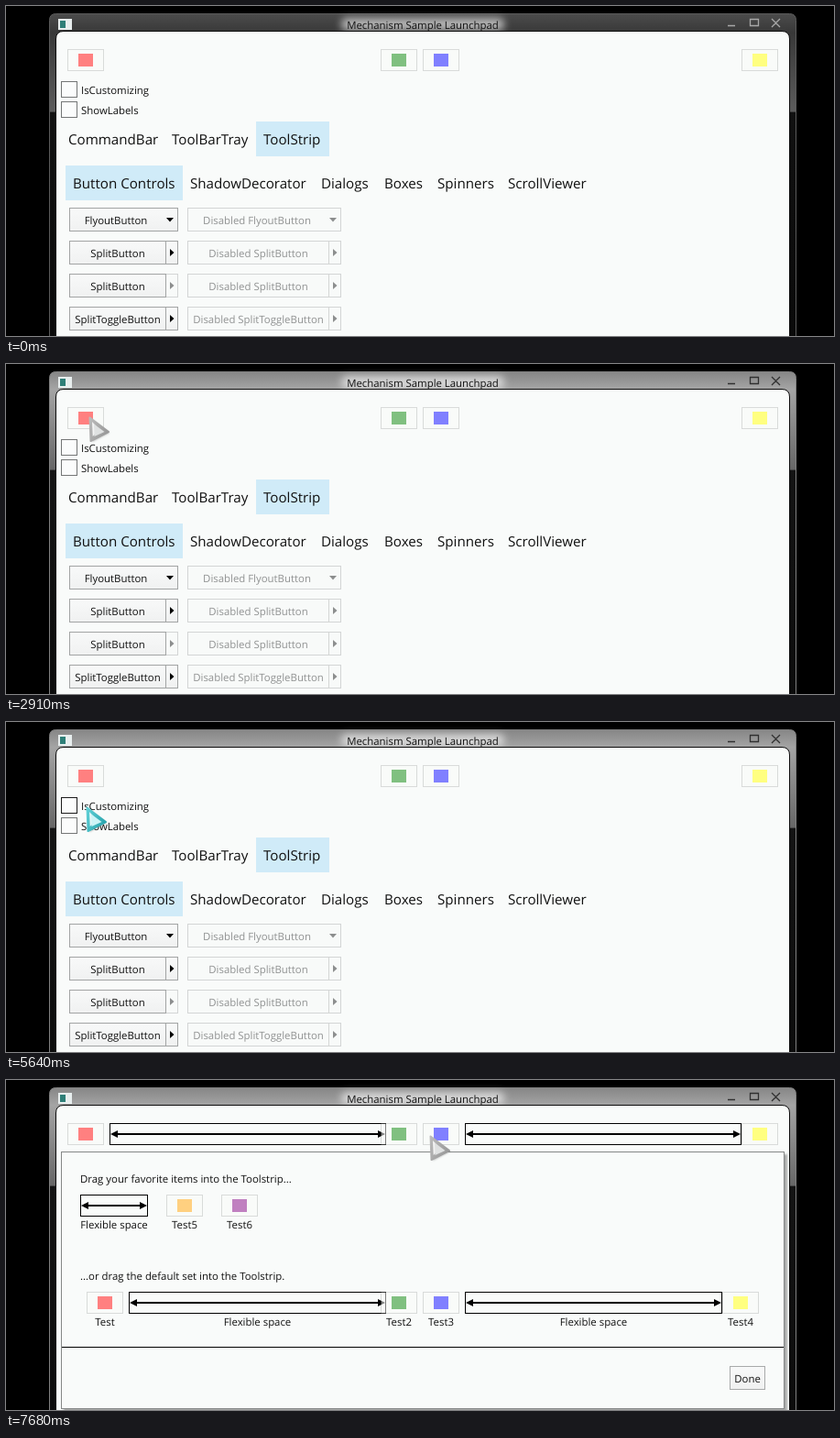
Write an HTML page that moves like this. It is 904 px wide and 360 px high and loops after 8 s.

```html
<!DOCTYPE html>
<html lang="en">
<head>
<meta charset="utf-8">
<title>Launchpad window</title>
<style>
html, body { margin: 0; width: 100%; height: 100%; overflow: hidden; background: #000; }
svg { display: block; width: 904px; height: 360px; }
text { font: 11.4px "Open Sans", "Noto Sans", sans-serif; fill: #111; text-rendering: geometricPrecision; }
.mid { text-anchor: middle; }
.tab { font-size: 15.15px; }
.off { fill: #909292; }
.box { fill: #fbfcfc; stroke: #747676; }
.hover .box { stroke: #1c1c1c; }
.tick { fill: none; stroke: #0b6496; stroke-width: 2.8; }
.hidden { display: none; }
#frame { fill: url(#dim); stroke: #5a5a5a; }
.active #frame { fill: url(#glass); stroke: #808080; }
#controls { stroke: #a8a8a8; }
.active #controls { stroke: #303030; }
</style>
</head>
<body>
<svg id="stage" viewBox="0 0 904 360">
  <defs>
    <linearGradient id="dim" x1="0" y1="8" x2="0" y2="360" gradientUnits="userSpaceOnUse">
      <stop offset="0" stop-color="#4c4c4c"/>
      <stop offset=".06" stop-color="#383838"/>
      <stop offset=".305" stop-color="#5c5c5c"/>
      <stop offset=".306" stop-color="#111"/>
      <stop offset="1" stop-color="#0a0a0a"/>
    </linearGradient>
    <linearGradient id="glass" x1="0" y1="8" x2="0" y2="360" gradientUnits="userSpaceOnUse">
      <stop offset="0" stop-color="#858585"/>
      <stop offset=".055" stop-color="#a4a4a4"/>
      <stop offset=".305" stop-color="#666"/>
      <stop offset=".306" stop-color="#141414"/>
      <stop offset="1" stop-color="#0c0c0c"/>
    </linearGradient>
    <linearGradient id="face" x1="0" y1="0" x2="0" y2="1">
      <stop offset="0" stop-color="#f8f9f9"/>
      <stop offset="1" stop-color="#f0f1f1"/>
    </linearGradient>
    <linearGradient id="silver" x1="0" y1="0" x2="1" y2=".6">
      <stop offset="0" stop-color="#bcbcbc"/>
      <stop offset="1" stop-color="#989898"/>
    </linearGradient>
    <linearGradient id="aqua" x1="0" y1="0" x2="1" y2=".6">
      <stop offset="0" stop-color="#62d2d8"/>
      <stop offset="1" stop-color="#2aa5ae"/>
    </linearGradient>
    <filter id="blur" x="-20%" y="-100%" width="140%" height="300%"><feGaussianBlur stdDeviation="4"/></filter>
    <filter id="soft"><feGaussianBlur stdDeviation="1"/></filter>
  </defs>

  <path id="frame" d="M47.5 360V15.5q0-7 7-7h801q7 0 7 7V360"/>
  <rect x="366" y="13" width="178" height="14" rx="6" fill="#fff" opacity=".62" filter="url(#blur)"/>
  <text class="mid" x="455" y="24.5">Mechanism Sample Launchpad</text>
  <rect x="57" y="14" width="15" height="12" fill="#e8eeee"/>
  <rect x="59" y="16" width="6" height="8" fill="#2f7f78"/>
  <g id="controls" fill="none" stroke-width="1.3">
    <path d="M788 21.5h8M812.5 14.5h9v7h-9zM836 14l9 9M845 14l-9 9"/>
  </g>
  <path d="M54.5 361V36q0-8.500 8.500-8.500h784q8.500 0 8.500 8.500V361z" fill="#f9fbfa" stroke="#0c0c0c"/>

  <g id="strip"></g>
  <g id="page"></g>
  <g id="panel"></g>

  <g id="cursor">
    <path d="M3 3L23 18L4 28z" fill="#000" opacity=".25" filter="url(#soft)"/>
    <path id="rim" d="M1.500 1.500L22 17L2.500 27z" stroke-width="2" stroke-linejoin="round"/>
    <path d="M4 6L12 14.500L4.700 22z" fill="#fff" opacity=".85"/>
    <path id="core" d="M6 8.500L17.500 17L6.500 22z"/>
  </g>
</svg>
<script>
const LOOP = 8000, TICK = 30;
const $ = id => document.getElementById(id);

const COLORS = {
  red: '#ff8080', green: '#80c080', blue: '#8080ff',
  yellow: '#ffff80', orange: '#ffd080', purple: '#c080c0'
};

const text = (x, y, s, cls = '') => `<text class="${cls}" x="${x}" y="${y}">${s}</text>`;
const rect = (x, y, w, h, fill, stroke) => stroke
  ? `<rect x="${x + .5}" y="${y + .5}" width="${w - 1}" height="${h - 1}" fill="${fill}" stroke="${stroke}"/>`
  : `<rect x="${x}" y="${y}" width="${w}" height="${h}" fill="${fill}"/>`;

const swatch = (x, y, color) =>
  rect(x, y, 40, 24, 'rgba(249,251,250,.5)', 'rgba(0,0,0,.13)') + rect(x + 12, y + 5, 16, 14, COLORS[color]);

function flex(x, y, w) {
  const a = x + 1, b = x + w - 1, m = y + 12;
  return rect(x, y, w, 24, 'none', '#000') +
    `<path d="M${a + 5} ${m}H${b - 5}" stroke="#000" stroke-width="2"/>` +
    `<path d="M${a} ${m}l8 -4v8zM${b} ${m}l-8 -4v8z"/>`;
}

const check = (id, y, label) => `<g id="${id}">
  <rect class="box" x="60.5" y="${y + .5}" width="17" height="17"/>
  <path class="tick hidden" d="M63.500 ${y + 9}l4 4.500l7 -9"/>
  ${text(82, y + 14, label)}</g>`;

function button(x, y, w, label, kind, enabled, arrowOn = enabled) {
  const line = on => on ? '#a2a4a4' : '#d3d5d5';
  const fill = on => on ? 'url(#face)' : '#f8faf9';
  const ink = arrowOn ? '#000' : '#8c8e8e';
  const end = x + w;
  let s = rect(x, y, w, 26, fill(arrowOn), line(arrowOn));
  if (kind === 'flyout') {
    s += `<path d="M${end - 13} ${y + 11}h8l-4 4.500z" fill="${ink}"/>`;
  } else {
    s += rect(x, y, w - 13, 26, fill(enabled), line(enabled));
    s += `<path d="M${end - 9} ${y + 9}v8l4.500 -4z" fill="${ink}"/>`;
  }
  const center = kind === 'flyout' ? x + w / 2 - 8.5 : x + (w - 13) / 2;
  return s + text(enabled ? center : Math.max(center, 274), y + 18, label, enabled ? 'mid' : 'mid off');
}

const tabs = (y, items) => items.map(([x, s]) => text(x, y, s, 'tab')).join('');

$('strip').innerHTML =
  `<g id="gaps">${flex(113, 47, 302)}${flex(501, 47, 302)}</g>` +
  [[67, 'red', 'Test'], [409, 'green', 'Test2'], [455, 'blue', 'Test3'], [803, 'yellow', 'Test4']]
    .map(([x, c, s]) => swatch(x, 47, c) + text(x + 20, 84, s, 'mid label')).join('');

$('page').innerHTML =
  check('customize', 82, 'IsCustomizing') + check('labels', 104, 'ShowLabels') +
  rect(273, 126, 80, 38, '#d0ebf8') + rect(65, 174, 128, 38, '#d0ebf8') +
  tabs(151, [[68, 'CommandBar'], [181, 'ToolBarTray'], [281, 'ToolStrip']]) +
  tabs(199, [[73, 'Button Controls'], [201, 'ShadowDecorator'], [344, 'Dialogs'],
    [413, 'Boxes'], [471, 'Spinners'], [548, 'ScrollViewer']]) +
  ['FlyoutButton', 'SplitButton', 'SplitButton', 'SplitToggleButton'].map((s, i) => {
    const y = 220 + 36 * i, kind = i ? 'split' : 'flyout';
    return button(69, y, 119, s, kind, true, i !== 2) +
      button(198, y, 168, 'Disabled ' + s, kind, false);
  }).join('');

$('panel').innerHTML =
  rect(63, 81, 790, 281, '#000').replace('/>', ' opacity=".32" filter="url(#soft)"/>') +
  rect(60, 78, 790, 281, '#f9fbfa', '#858787') +
  text(81, 112, 'Drag your favorite items into the Toolstrip...') +
  flex(81, 125, 74) + swatch(175, 125, 'orange') + swatch(235, 125, 'purple') +
  text(118, 162, 'Flexible space', 'mid') + text(195, 162, 'Test5', 'mid') + text(255, 162, 'Test6', 'mid') +
  text(81, 218, '...or drag the default set into the Toolstrip.') +
  flex(134, 231, 281) + flex(501, 231, 281) +
  [[88, 'red'], [409, 'green'], [455, 'blue'], [782, 'yellow']].map(([x, c]) => swatch(x, 231, c)).join('') +
  [[108, 'Test'], [274.5, 'Flexible space'], [429, 'Test2'], [475, 'Test3'],
    [641.5, 'Flexible space'], [802, 'Test4']].map(([x, s]) => text(x, 268, s, 'mid')).join('') +
  rect(61, 291, 788, 1, '#000') +
  rect(790, 312, 39, 26, 'url(#face)', '#a8aaaa') + text(809.5, 330, 'Done', 'mid');

// Pointer path: time, left, top
const PATH = [
  [240, 862, 60], [360, 735, 98], [480, 669, 114], [690, 669, 114],
  [720, 624, 114], [750, 510, 115], [810, 258, 115], [870, 172, 112],
  [960, 124, 103], [1080, 108, 98], [1260, 104, 96], [1890, 104, 96],
  [1920, 101, 89], [1980, 85, 63], [2130, 85, 63],
  [2250, 230, 56], [2370, 520, 50], [2460, 615, 51], [2610, 615, 51],
  [2730, 390, 49], [2790, 220, 50], [2850, 125, 54], [2910, 90, 57],
  [3060, 88, 66], [3210, 93, 80], [3360, 98, 88], [3570, 98, 88],
  [3690, 95, 113], [4890, 95, 113], [5010, 92, 102], [5250, 87, 92], [6180, 87, 92],
  [6330, 106, 101], [6570, 168, 122], [6690, 194, 132], [6780, 201, 134], [6990, 201, 134],
  [7110, 228, 126], [7350, 365, 90], [7530, 442, 66], [7680, 462, 60]
];

function pointer(t) {
  const i = PATH.findIndex(p => p[0] > t);
  if (i < 0) return PATH[PATH.length - 1].slice(1);
  if (i === 0) return PATH[0].slice(1);
  const [t0, x0, y0] = PATH[i - 1], [t1, x1, y1] = PATH[i];
  const k = (t - t0) / (t1 - t0);
  return [Math.round(x0 + (x1 - x0) * k), Math.round(y0 + (y1 - y0) * k)];
}

const within = (t, a, b) => t >= a && t < b;
const show = (el, on) => el.classList.toggle('hidden', !on);
const shift = (el, y) => el.setAttribute('transform', `translate(0 ${y})`);
const labelTexts = document.querySelectorAll('.label');

function draw(now) {
  const t = Math.floor(now % LOOP / TICK) * TICK;
  const labeled = within(t, 4080, 4920);
  const customizing = t >= 5670;
  const pressed = within(t, 3720, 4080) || within(t, 4890, 4920) || within(t, 5640, 5670);
  const [x, y] = pointer(t);
  const drop = labeled ? 2 : 0;

  $('stage').classList.toggle('active', t >= 240);
  shift($('strip'), labeled ? -7 : 0);
  shift($('page'), drop);
  labelTexts.forEach(el => show(el, labeled));
  show($('gaps'), customizing);
  show($('panel'), customizing);
  show($('page'), !customizing);
  show($('labels').querySelector('.tick'), labeled);

  const over = (top, right) => t >= 240 && within(x, 60, right) && within(y - drop, top, top + 19);
  $('customize').classList.toggle('hover', over(82, 157));
  $('labels').classList.toggle('hover', over(104, 145));

  show($('cursor'), t >= 240);
  $('cursor').setAttribute('transform', `translate(${x} ${y})`);
  const paint = pressed ? 'url(#aqua)' : 'url(#silver)';
  $('rim').setAttribute('fill', paint);
  $('rim').setAttribute('stroke', paint);
  $('core').setAttribute('fill', pressed ? '#cdf4f6' : '#dfe1e1');
}

const start = performance.now();
function loop() {
  draw(performance.now() - start);
  requestAnimationFrame(loop);
}
loop();
</script>
</body>
</html>
```
